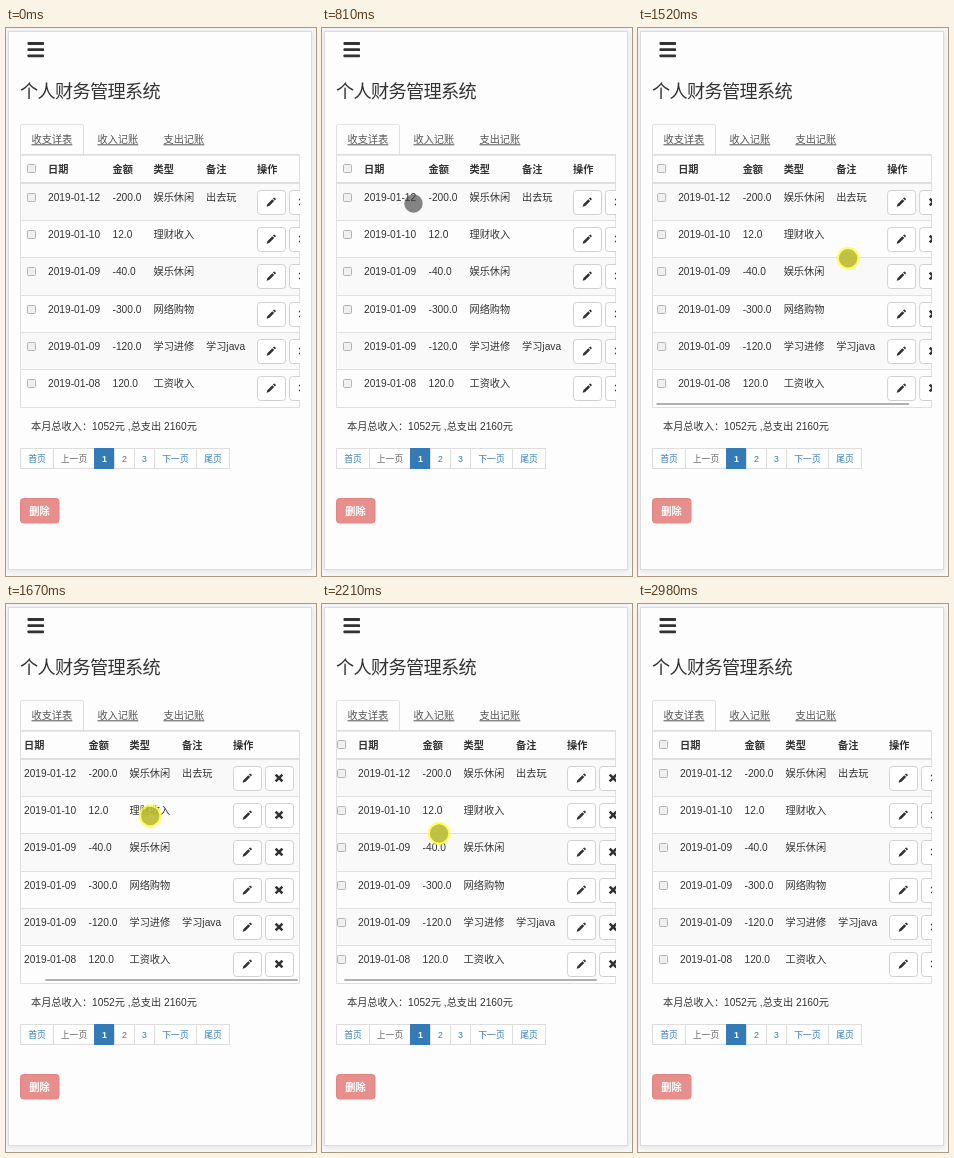
Write an HTML page that moves like this. It is 310 by 548 pixels and loops after 3680 ms.

```html
<!DOCTYPE html>
<html lang="zh-CN">
<head>
<meta charset="utf-8">
<title>个人财务管理系统</title>
<style>
  html, body { margin: 0; width: 100%; height: 100%; overflow: hidden; background: #f8f8f8; }
  svg { display: block; width: 310px; height: 548px; }
  text { font: 10.2px "Liberation Sans", Arial, "Noto Sans CJK SC", "Noto Sans CJK", sans-serif; fill: #333; white-space: pre; }
  .card { fill: #fdfdfd; stroke: #dcdcdc; filter: drop-shadow(0 1px 3px rgba(0, 0, 0, .1)); }
  .title { font-size: 18.2px; font-weight: 300; letter-spacing: -.7px; }
  .bold { font-weight: 700; }
  .tab { fill: #555; text-decoration: underline; }
  .page { font-size: 8.8px; fill: #337ab7; text-anchor: middle; }
  .muted { fill: #666; }
  .white { fill: #fff; }
  .line { stroke: #e0e0e0; fill: none; }
  .cell { fill: #fff; stroke: #ddd; }
  .active { fill: #337ab7; stroke: #337ab7; }
  .btn { fill: #fff; stroke: #d0d0d0; }
  .danger { fill: #e68f8c; stroke: #e38481; }
  .glyph { fill: #333; }
  .cross { stroke: #333; stroke-width: 2.6; }
</style>
</head>
<body>
<svg id="stage" viewBox="0 0 310 548">
  <defs>
    <clipPath id="view"><rect x="14" y="127" width="280" height="253"/></clipPath>
    <rect id="check" x=".5" y=".5" width="8" height="8" rx="1" fill="#f0f0f0" stroke="#b4b4b4"/>
    <g id="edit">
      <rect class="btn" x=".5" y=".5" width="28" height="24" rx="3"/>
      <path class="glyph" d="M9.6 16.8L10.3 14.2L15.3 9.2L17.2 11.1L12.2 16.1ZM15.9 8.5L16.8 7.7Q17.2 7.4 17.7 7.8L18.7 8.8Q19 9.2 18.7 9.6L17.9 10.5Z"/>
    </g>
    <g id="remove">
      <rect class="btn" x=".5" y=".5" width="28" height="24" rx="3"/>
      <path class="cross" d="M10.6 8.6L17.4 15.4M17.4 8.6L10.6 15.4"/>
    </g>
  </defs>
</svg>
<script>
const LOOP = 3680, MAX_SCROLL = 24, TOP = 155.8, ROW_H = 37.3;
const cols = [42, 106.5, 147.5, 200, 251];
const heads = ['日期', '金额', '类型', '备注', '操作'];
const rows = [
  ['2019-01-12', '-200.0', '娱乐休闲', '出去玩'],
  ['2019-01-10', '12.0', '理财收入', ''],
  ['2019-01-09', '-40.0', '娱乐休闲', ''],
  ['2019-01-09', '-300.0', '网络购物', ''],
  ['2019-01-09', '-120.0', '学习进修', '学习java'],
  ['2019-01-08', '120.0', '工资收入', '']
];
const pages = ['首页', '上一页', '1', '2', '3', '下一页', '尾页'];

const text = (x, y, s, cls = '') => `<text x="${x}" y="${y}" class="${cls}">${s}</text>`;
const use = (id, x, y) => `<use href="#${id}" x="${x}" y="${y}"/>`;
const hline = (y, w = 1) => `<path class="line" stroke-width="${w}" d="M14 ${y}H294"/>`;
const each = (list, fn) => list.map(fn).join('');
const rowTop = i => Math.round(TOP + i * ROW_H);

function header() {
  const bar = (_, i) =>
    `<rect class="glyph" x="21.5" y="${14.1 + i * 6.2}" width="16.5" height="2.8" rx=".7"/>`;
  const tab = (s, i) => text(25.5 + i * 66, 115.3, s, 'tab');
  return `<rect class="card" x="2.5" y="3.5" width="303" height="538"/>` +
    each([0, 1, 2], bar) + text(14, 69.7, '个人财务管理系统', 'title') +
    `<path class="line" d="M14.5 126.5V98.5Q14.5 96.5 16.5 96.5H75.5Q77.5 96.5 77.5 98.5V126.5H294"/>` +
    each(['收支详表', '收入记账', '支出记账'], tab);
}

function row(cells, i) {
  const y = rowTop(i);
  return use('check', 21, y + 9) + each(cells, (s, c) => text(cols[c], y + 17.3, s)) +
    use('edit', 251, y + 6) + use('remove', 283, y + 6);
}

function backdrop(_, i) {
  const y = rowTop(i), fill = i % 2 ? 'none' : '#f9f9f9';
  return `<rect x="14" y="${y}" width="280" height="${ROW_H}" fill="${fill}"/>` +
    (i ? hline(y - .5) : hline(155, 2));
}

function table() {
  return each(rows, backdrop) + hline(127, 1.4) +
    `<rect class="line" x="14.5" y="126.5" width="279" height="253"/>` +
    `<g clip-path="url(#view)"><g id="body">` + use('check', 21, 136) +
    each(heads, (s, c) => text(cols[c], 145.3, s, 'bold')) + each(rows, row) + `</g></g>` +
    `<rect id="thumb" y="375" width="253" height="2" rx="1" fill="#b0b0b0"/>`;
}

function pager() {
  let x = 14;
  return each(pages, s => {
    const on = s === '1', left = Math.round(x);
    x += 15.2 + (/\d/.test(s) ? 4.9 : 8.75 * s.length);
    const w = Math.round(x) - left;
    const cls = on ? 'white bold' : s === '上一页' ? 'muted' : '';
    return `<rect class="cell ${on ? 'active' : ''}" x="${left + .5}" y="420.5" width="${w}" height="20"/>` +
      text(left + w / 2 + .5, 433.5, s, 'page ' + cls);
  });
}

function footer() {
  return text(25, 402.3, '本月总收入：1052元 ,总支出 2160元') + pager() +
    `<rect class="danger" x="14.5" y="470.5" width="38.5" height="24.5" rx="3"/>` +
    text(23.3, 487, '删除', 'white bold');
}

const pointer = `<g id="pointer">
  <circle id="halo" r="11.4" fill="#ffff3c" fill-opacity=".8"/><circle id="dot" r="9.2"/></g>`;
const $ = id => document.getElementById(id);
$('stage').insertAdjacentHTML('beforeend', header() + table() + footer() + pointer);
const [body, thumb, hand, halo, dot] = ['body', 'thumb', 'pointer', 'halo', 'dot'].map($);

// Each move is a curve walked in n jumps; grab is the x that pins the table while dragging
const moves = [
  { start: 350, end: 810, n: 7, from: [256, 526], via: [23, 52], to: [91.5, 175.5] },
  { start: 890, end: 1290, n: 6, via: [158, 206], to: [224, 236] },
  { start: 1520, end: 1900, n: 6, via: [128, 195], to: [97, 222], grab: 212 },
  { start: 2050, end: 2520, n: 7, via: [105, 228], to: [202, 252], grab: 123 },
  { start: 2590, end: 2980, n: 6, via: [215, 330], to: [288, 575] }
];
moves.forEach((m, i) => m.from ??= moves[i - 1].to);

const clamp = (v, lo, hi) => Math.min(hi, Math.max(lo, v));
const smooth = u => u * u * (3 - 2 * u);
const curve = (a, b, c, u) => (1 - u) ** 2 * a + 2 * u * (1 - u) * b + u * u * c;

function draw(time) {
  const i = moves.findLastIndex(m => time >= m.start);
  const m = moves[Math.max(i, 0)];
  const gap = (m.end - m.start) / (m.n - 1);
  const step = clamp(Math.floor((time - m.start + 1) / gap) + 1, 0, m.n);
  const u = step / m.n, e = smooth(u);
  const [x, y] = [0, 1].map(k => curve(m.from[k], m.via[k], m.to[k], e));
  const off = m.grab ? clamp(m.grab - x, 0, MAX_SCROLL) : 0;

  hand.setAttribute('transform', `translate(${x} ${y})`);
  hand.setAttribute('opacity', i < 0 ? 0 : 1);
  halo.setAttribute('opacity', m.grab ? 1 : 0);
  dot.setAttribute('fill', m.grab ? 'rgba(120,120,30,.46)' : 'rgba(64,64,64,.64)');
  body.setAttribute('transform', `translate(${-off} 0)`);
  thumb.setAttribute('x', 16.5 + off * .94);
  thumb.setAttribute('opacity', m.grab ? 1 : i === 4 ? 1 - u : 0);
}

const start = performance.now();
function loop() {
  draw((performance.now() - start) % LOOP);
  requestAnimationFrame(loop);
}
loop();
</script>
</body>
</html>
```
